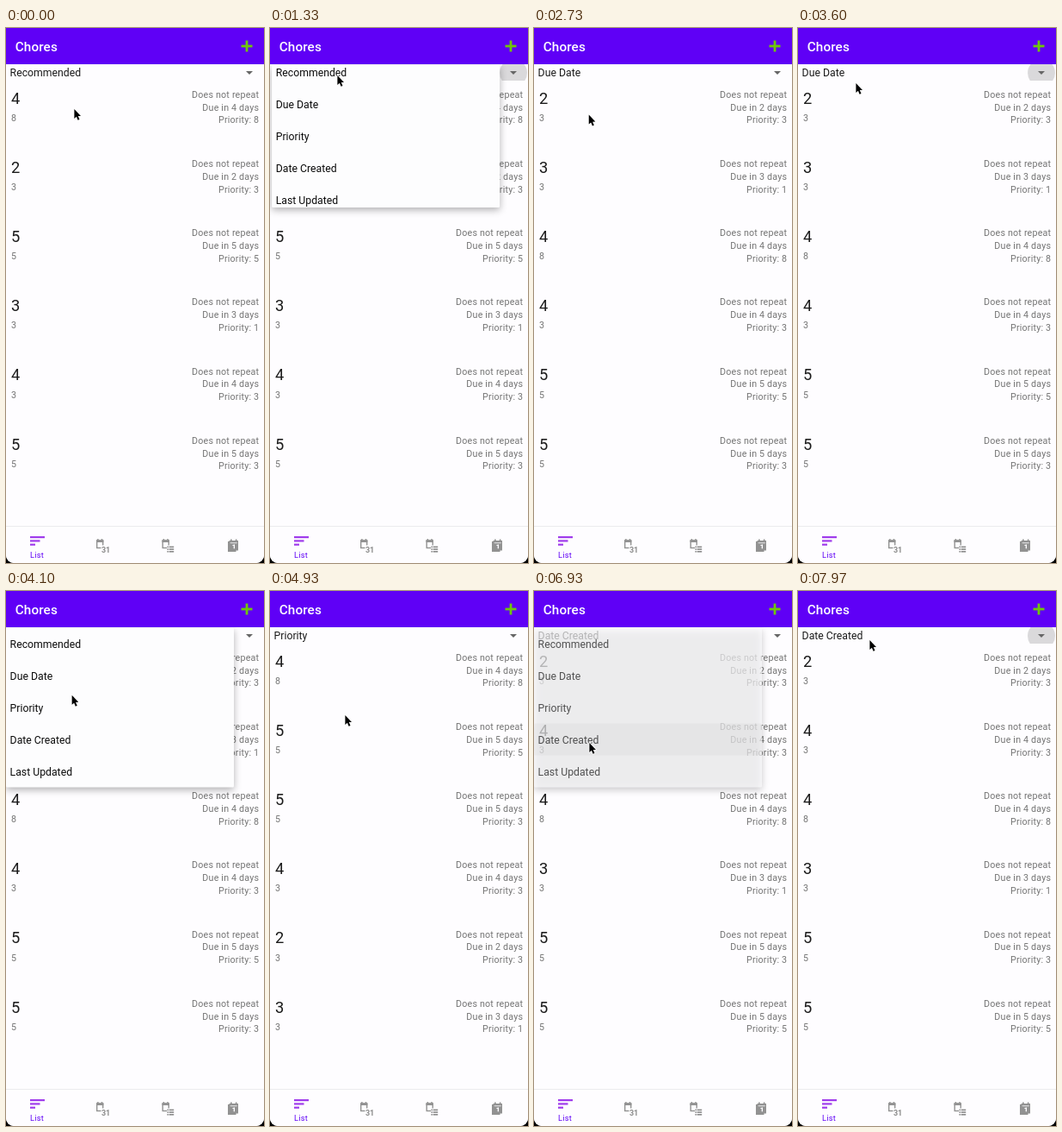
An HTML page with a canvas for the animation above (8 s loop, 300 by 620 pixels).

```html
<!DOCTYPE html>
<html lang="en">
<head>
<meta charset="utf-8">
<title>Chores</title>
<style>
  html, body { margin: 0; width: 100%; height: 100%; overflow: hidden; background: #000; }
  canvas { display: block; width: 300px; height: 620px; }
</style>
</head>
<body>
<canvas id="stage"></canvas>
<script>
const W = 300, H = 620, LOOP = 8000;
const canvas = document.getElementById('stage');
const ctx = canvas.getContext('2d');
const dpr = window.devicePixelRatio || 1;
canvas.width = W * dpr;
canvas.height = H * dpr;

const PURPLE = '#5f00f6', PAPER = '#fefdff', GREY = '#747474', INK = '#1b1b1b';
const OPTIONS = ['Recommended', 'Due Date', 'Priority', 'Date Created', 'Last Updated'];
const POPUP = { top: 42.5, width: 265, item: 37, height: 185 };

// Each row: days until due, small number, priority
const ORDERS = [
  '488 233 555 331 433 553',
  '233 331 488 433 555 553',
  '488 555 553 433 233 331',
  '233 433 488 331 553 555'
].map(order => order.split(' '));

// Spinner press, popup opening, option press and option index
const PICKS = [
  { press: 1070, open: 1190, tap: 2130, option: 1 },
  { press: 3470, open: 3640, tap: 4630, option: 2 },
  { press: 5670, open: 5810, tap: 6730, option: 3 },
  { press: 7770, open: 7995, tap: 9000, option: 0 }
];
const CLOSE_DELAY = 170, CLOSE_TIME = 100;

// Pointer stops: time, x, y
const PATH = [
  [0, 79, 94], [30, 79, 94], [270, 80, 47], [430, 80, 47], [530, 78, 55],
  [1770, 78, 55], [2080, 63, 104], [2600, 63, 104], [3330, 67, 64],
  [3900, 67, 64], [4230, 81, 150], [4330, 81, 150], [4400, 82, 146],
  [4880, 82, 146], [4930, 87, 144], [5400, 89, 57], [5950, 89, 57],
  [6070, 94, 91], [6470, 65, 176], [6500, 64, 176], [7020, 64, 176],
  [7530, 85, 62], [7570, 85, 62], [7630, 83, 57], [LOOP, 83, 57]
];

const clamp = v => Math.max(0, Math.min(1, v));
const ramp = (t, start, length) => clamp((t - start) / length);
const smooth = u => u * u * (3 - 2 * u);

function bezier(x1, y1, x2, y2) {
  const at = (a, b, s) => 3 * (1 - s) * (1 - s) * s * a + 3 * (1 - s) * s * s * b + s * s * s;
  return u => {
    let lo = 0, hi = 1;
    for (let i = 0; i < 20; i++) {
      const mid = (lo + hi) / 2;
      if (at(x1, x2, mid) < u) lo = mid; else hi = mid;
    }
    return at(y1, y2, (lo + hi) / 2);
  };
}
const slowIn = bezier(0, 0, 0.2, 1);
const fastOutSlowIn = bezier(0.4, 0, 0.2, 1);

function text(str, x, y, size, color, { align = 'left', weight = 400, spacing = 0 } = {}) {
  ctx.font = `${weight} ${size}px Roboto, sans-serif`;
  ctx.letterSpacing = spacing + 'px';
  ctx.textAlign = align;
  ctx.fillStyle = color;
  ctx.fillText(str, x, y);
}

function rect(x, y, w, h, color) {
  ctx.fillStyle = color;
  ctx.fillRect(x, y, w, h);
}

function disc(x, y, r, color) {
  ctx.fillStyle = color;
  ctx.beginPath();
  ctx.arc(x, y, r, 0, Math.PI * 2);
  ctx.fill();
}

function poly(points, color) {
  ctx.fillStyle = color;
  ctx.beginPath();
  points.forEach(([x, y]) => ctx.lineTo(x, y));
  ctx.closePath();
  ctx.fill();
}

function clipped(x, y, w, h, draw) {
  ctx.save();
  ctx.beginPath();
  ctx.rect(x, y, w, h);
  ctx.clip();
  draw();
  ctx.restore();
}

function drawHeader() {
  rect(0, 0, W, 42, PURPLE);
  text('Chores', 10.7, 27, 15.3, '#fff', { weight: 500, spacing: 0.11 });
  rect(273.5, 19.6, 13, 2.8, '#6fc70a');
  rect(278.6, 14.5, 2.8, 13, '#6fc70a');
}

function drawSpinner(t, label) {
  for (const { press, open } of PICKS) {
    const alpha = ramp(t, press, 75) * (1 - ramp(t, open + 150, 300));
    if (!alpha) continue;
    const r = 16 * (0.6 + 0.4 * fastOutSlowIn(ramp(t, press, 150)));
    clipped(0, 42, W, 19, () => disc(283, 52, r, `rgba(0,0,0,${0.14 * alpha})`));
  }
  text(label, 4.6, 56.4, 12.25, INK);
  poly([[279, 50], [287, 50], [283, 54]], '#666');
}

function drawRow(row, i) {
  const [days, small, priority] = row;
  const y = i * 80.2;
  const right = { align: 'right', spacing: 0.19 };
  text(days, 5.9, y + 87.5, 18.3, INK);
  text(small, 6.1, y + 107.8, 10.7, GREY, { spacing: 0.19 });
  text('Does not repeat', 294.2, y + 80.7, 10.7, GREY, right);
  text(`Due in ${days} days`, 294.2, y + 95.5, 10.7, GREY, right);
  text(`Priority: ${priority}`, 294.2, y + 110.4, 10.7, GREY, right);
}

function clipboard(x, y) {
  ctx.strokeStyle = '#929292';
  ctx.lineWidth = 1.4;
  ctx.strokeRect(x + 0.7, y + 2, 7, 8.5);
  rect(x, y + 1.4, 8.4, 2.6, '#929292');
  rect(x + 1.2, y, 1.4, 2, '#929292');
  rect(x + 5.8, y, 1.4, 2, '#929292');
}

function drawNav() {
  rect(0, 577, W, 43, '#fefdff');
  rect(0, 577, W, 1, '#ececee');
  [17, 11.5, 6].forEach((w, i) => rect(28, 589 + i * 4.3, w, 2.2, '#a03cec'));
  text('List', 36.1, 613.8, 9.2, PURPLE, { align: 'center', spacing: 0.28 });

  clipboard(105, 592);
  rect(110.5, 599.5, 11, 9, PAPER);
  text('31', 110.9, 607.6, 9, '#8a8a8a', { weight: 700 });

  clipboard(181.5, 592);
  rect(187, 599.5, 9, 9, PAPER);
  for (let i = 0; i < 3; i++) {
    rect(187.4, 600.6 + i * 2.7, 1.5, 1.6, '#8a8a8a');
    rect(189.6, 600.6 + i * 2.7, 5.6, 1.6, '#8a8a8a');
  }

  rect(258, 595, 9.5, 12, '#929292');
  rect(259.5, 594, 10.5, 11.5, '#929292');
  rect(261, 592.5, 1.7, 2, '#929292');
  rect(266.8, 592.5, 1.7, 2, '#929292');
  rect(260.7, 596.4, 8, 0.8, PAPER);
  rect(264.7, 598.5, 1.3, 4.8, PAPER);
  rect(263.4, 599, 1.5, 1, PAPER);
}

function drawPopup(t, { open, tap, option }) {
  const { top, width, item, height } = POPUP;
  const alpha = ramp(t, open, 100) * (1 - ramp(t, tap + CLOSE_DELAY, CLOSE_TIME));
  if (!alpha) return;
  const rest = 1 - slowIn(ramp(t, open, 250));
  const dx = 18 * rest, dy = top - 83 * rest;
  const cut = 82 * rest;

  ctx.save();
  ctx.globalAlpha = alpha;
  ctx.beginPath();
  ctx.rect(0, 42, W, H);
  ctx.clip();
  ctx.translate(dx, dy);

  ctx.save();
  ctx.shadowColor = 'rgba(0,0,0,0.3)';
  ctx.shadowBlur = 9 * dpr;
  ctx.shadowOffsetY = 3 * dpr;
  ctx.fillStyle = '#fdfdfe';
  ctx.beginPath();
  ctx.roundRect(0, cut, width, height - 2 * cut, 1.5);
  ctx.fill();
  ctx.restore();

  clipped(0, cut, width, height - 2 * cut, () => {
    const grow = ramp(t, tap, 225);
    if (grow) {
      clipped(0, option * item, width, item, () =>
        disc(width / 2, (option + 0.5) * item, 134 * fastOutSlowIn(grow),
          `rgba(0,0,0,${0.045 * ramp(t, tap, 75)})`));
    }
    OPTIONS.forEach((name, i) => text(name, 4.6, i * item + 23.2, 12.25, '#0c0c0c'));
  });
  ctx.restore();
}

function drawPointer(t) {
  const i = Math.max(1, PATH.findIndex(stop => stop[0] > t));
  const [t0, x0, y0] = PATH[i - 1], [t1, x1, y1] = PATH[i];
  const u = smooth(ramp(t, t0, t1 - t0));
  ctx.save();
  ctx.translate(x0 + (x1 - x0) * u, y0 + (y1 - y0) * u);
  ctx.lineJoin = 'round';
  ctx.lineWidth = 1.6;
  ctx.strokeStyle = '#fff';
  poly([[0.4, 0], [0.4, 11], [2.9, 8.8], [4.6, 12.8], [6.5, 12], [4.8, 8.1], [8, 7.9]], '#000');
  ctx.stroke();
  ctx.fill();
  ctx.restore();
}

function draw(t) {
  ctx.setTransform(dpr, 0, 0, dpr, 0, 0);
  rect(0, 0, W, H, '#000');
  ctx.save();
  ctx.beginPath();
  ctx.roundRect(0, 0, W, H, [0, 0, 9, 9]);
  ctx.clip();
  rect(0, 0, W, H, PAPER);

  const chosen = PICKS.filter(p => t >= p.tap + CLOSE_DELAY).length;
  ORDERS[chosen].forEach(drawRow);
  drawSpinner(t, OPTIONS[chosen]);
  drawNav();
  drawHeader();
  PICKS.forEach(pick => drawPopup(t, pick));
  drawPointer(t);
  ctx.restore();
}

const begin = performance.now();
function tick() {
  draw((performance.now() - begin) % LOOP);
  requestAnimationFrame(tick);
}
tick();
</script>
</body>
</html>
```
